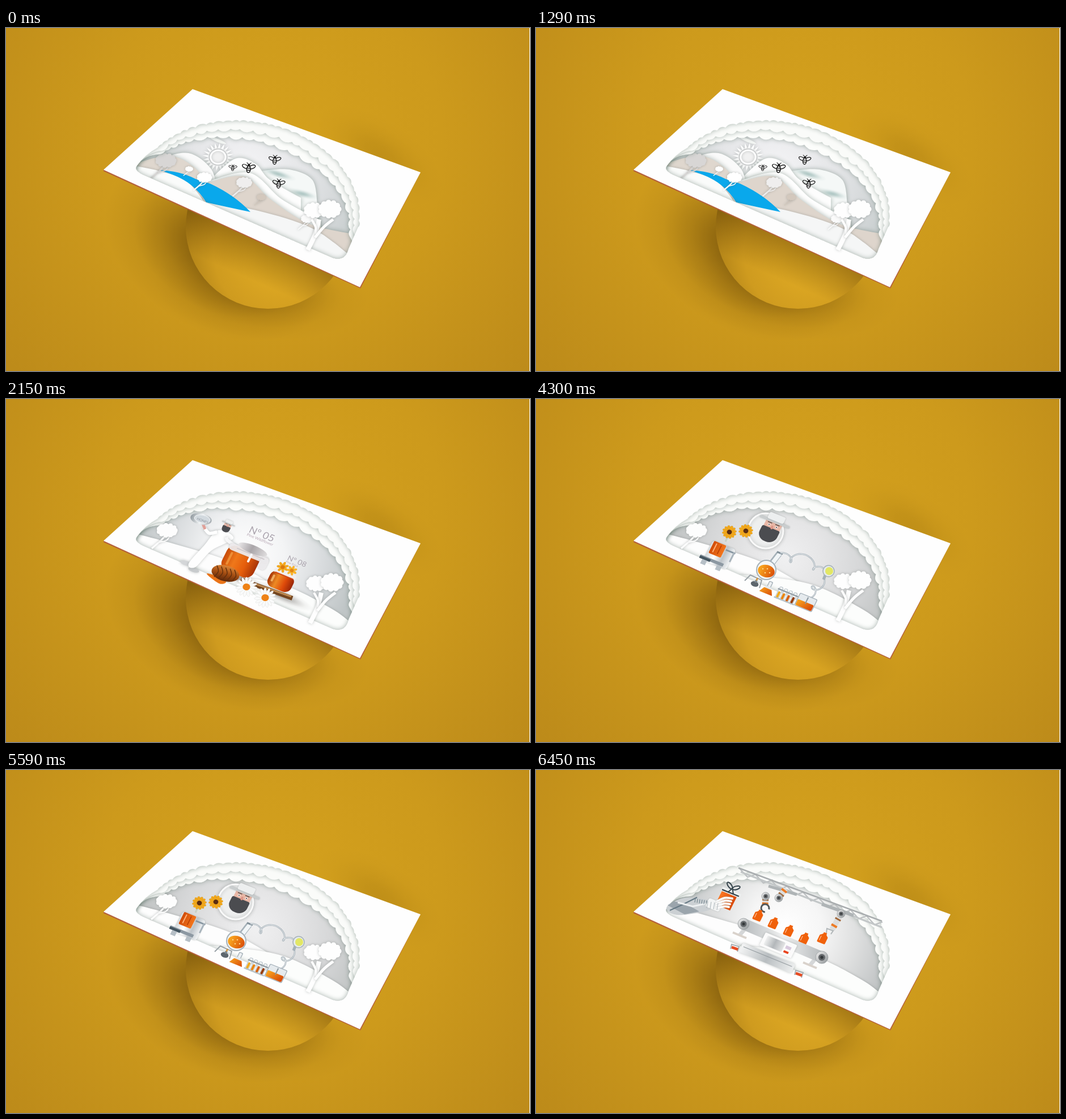
Animation, 924 px wide and 606 px high, one loop 8.6 s. Source, as an HTML page with a canvas:

```html
<!DOCTYPE html>
<html lang="en">
<head>
<meta charset="utf-8">
<title>Paper cut card</title>
<style>
html, body { margin: 0; width: 100%; height: 100%; overflow: hidden; background: #c8961c; }
canvas { display: block; }
</style>
</head>
<body>
<canvas id="stage" width="924" height="606"></canvas>
<script>
const c = document.getElementById('stage').getContext('2d');
const HOLD = 2150, TAU = Math.PI * 2;
const SHADE = 'rgba(82,105,94,.5)', SOFT = 'rgba(85,95,92,.36)';
let seed;
const rnd = () => (seed = seed * 16807 % 2147483647) / 2147483647;

// Paths
function poly(p, open) {
  const d = new Path2D();
  for (let i = 0; i < p.length; i += 2) d.lineTo(p[i], p[i + 1]);
  if (!open) d.closePath();
  return d;
}
function curve(p, open) {
  const d = new Path2D(), n = p.length / 2;
  const get = (i, k) => p[2 * (open ? Math.max(0, Math.min(n - 1, i)) : (i + n) % n) + k];
  d.moveTo(p[0], p[1]);
  for (let i = 0; i < n - (open ? 1 : 0); i++) {
    const q = [0, 1].map(k => {
      const [a, b, e, f] = [i - 1, i, i + 1, i + 2].map(j => get(j, k));
      return [b + (e - a) / 6, e - (f - b) / 6, e];
    });
    d.bezierCurveTo(q[0][0], q[1][0], q[0][1], q[1][1], q[0][2], q[1][2]);
  }
  if (!open) d.closePath();
  return d;
}

// Paint
function fill(p, color) { c.fillStyle = color; c.fill(p instanceof Path2D ? p : poly(p)); }
const blob = (p, color) => fill(curve(p), color);
function line(p, color, w = 1, smooth) {
  c.strokeStyle = color; c.lineWidth = w;
  c.stroke(smooth ? curve(p, true) : poly(p, true));
}
function box(x, y, w, h, color, r = 0, edge) {
  c.beginPath(); c.roundRect(x, y, w, h, r);
  c.fillStyle = color; c.fill();
  if (edge) { c.strokeStyle = edge; c.lineWidth = 1.4; c.stroke(); }
}
function oval(x, y, rx, ry, color, rot = 0, edge, w = 1) {
  c.beginPath(); c.ellipse(x, y, rx, ry, rot, 0, TAU);
  if (color) { c.fillStyle = color; c.fill(); }
  if (edge) { c.strokeStyle = edge; c.lineWidth = w; c.stroke(); }
}
const dot = (x, y, r, color, edge, w) => oval(x, y, r, r, color, 0, edge, w);
function ramp(g, stops) {
  stops.forEach((s, i) => g.addColorStop(i / (stops.length - 1), s));
  return g;
}
const lin = (x, y, u, v, ...s) => ramp(c.createLinearGradient(x, y, u, v), s);
const rad = (x, y, r, ...s) => ramp(c.createRadialGradient(x, y, 0, x, y, r), s);
function shaded(blur, color, draw) {
  c.save(); c.shadowBlur = blur; c.shadowColor = color; draw(); c.restore();
}
// Tilted frame lying on the card
function at(x, y, s, draw) {
  c.save(); c.transform(.93 * s, .38 * s, -.42 * s, .85 * s, x, y); draw(); c.restore();
}
function glow(x, y, rx, ry, rgb, alpha, rot = 0) {
  const tone = k => `rgba(${rgb},${alpha * k})`;
  c.save(); c.translate(x, y); c.rotate(rot); c.scale(rx, ry);
  c.fillStyle = rad(0, 0, 1, tone(1), tone(.8), tone(.42), tone(.12), tone(0));
  c.fillRect(-1, -1, 2, 2); c.restore();
}
// Cut-out with the shadow of its rim falling inside
function hole(d, color, paint) {
  c.save(); c.clip(d); c.fillStyle = color; c.fillRect(200, 140, 450, 300);
  paint();
  const rim = new Path2D(); rim.rect(0, 0, 924, 606); rim.addPath(d);
  c.shadowBlur = 9; c.shadowColor = SHADE; c.fillStyle = '#fff';
  c.fill(rim, 'evenodd'); c.restore();
}

function backdrop() {
  c.fillStyle = rad(470, 210, 600, '#d4a11d', '#cd9a1c', '#bd8b1a');
  c.fillRect(0, 0, 924, 606);
  glow(660, 225, 130, 60, '110,75,0', .16, .6);
  glow(375, 390, 215, 145, '70,42,0', .6, .5);
  glow(450, 465, 190, 85, '70,42,0', .3, .1);
  const ball = new Path2D(); ball.arc(462, 351, 145, 0, TAU);
  fill(ball, rad(490, 395, 185, '#dfab23', '#dba622', '#cf9b1f', '#a97c16'));
  fill(ball, lin(405, 352, 375, 420, 'rgba(80,50,0,.42)', 'rgba(80,50,0,0)'));
  fill([172, 250, 624, 456, 731, 255, 625, 460, 172, 253], '#b5603c');
  fill([329, 108, 731, 255, 624, 458, 172, 250.5], '#fefefe');
  c.fillStyle = '#fff'; c.fillRect(923, 0, 1, 606);
}

// Scalloped rim along a slanted half ellipse; depth shrinks it towards the sky
function rim(depth, size, bulge) {
  const d = new Path2D(), w = 1 - .05 * depth, h = 1 - .2 * depth;
  const pt = a => [420 - 185 * w * Math.cos(a) + 82 * h * Math.sin(a), 322 - 73 * w * Math.cos(a) - 139 * h * Math.sin(a)];
  let a = .3, [x, y] = pt(a);
  d.moveTo(231, 243); d.quadraticCurveTo(244, 224, x, y);
  while (a < 2.85) {
    a += size * (.7 + .6 * rnd());
    const [u, v] = pt(a), b = bulge * (.7 + .7 * rnd());
    d.quadraticCurveTo((x + u) / 2 + (v - y) * b, (y + v) / 2 - (u - x) * b, u, v);
    [x, y] = [u, v];
  }
  return d;
}
function frame(sky, inside) {
  seed = 77;
  const outer = rim(0, .08, .3);
  outer.lineTo(604, 390); outer.quadraticCurveTo(598, 413, 576, 406);
  outer.lineTo(246, 261); outer.quadraticCurveTo(224, 252, 231, 243);
  const [mid, inner] = [[.5, .1], [1, .11]].map(([depth, size]) => {
    const d = rim(depth, size, -.34);
    d.lineTo(650, 450); d.lineTo(190, 310); d.closePath();
    return d;
  });
  hole(outer, '#fafbf9', () => hole(mid, '#fcfdfb', () => hole(inner, sky, inside)));
}
// Smooth ridge, filled down to the bottom
function hill(p, color) {
  const d = curve(p, true);
  d.lineTo(p[p.length - 2], 440); d.lineTo(p[0], 440);
  fill(d, color);
}
function ground() {
  shaded(5, SOFT, () => {
    hill([205, 232, 300, 257, 400, 289, 490, 340], '#fdfdfd');
    hill([360, 310, 480, 326, 575, 371, 625, 410], '#fcfdfc');
  });
}

function crown(x, y, rx, ry, color) {
  const d = new Path2D();
  d.ellipse(x, y, rx, ry, .15, 0, TAU);
  for (let i = 0; i < 11; i++) {
    const a = i / 11 * TAU, r = ry * .36, u = x + Math.cos(a) * rx * .82, v = y + Math.sin(a) * ry * .82;
    d.moveTo(u + r, v); d.arc(u, v, r, 0, TAU);
  }
  fill(d, color);
}
function tree(x, y, s, color) {
  c.save(); c.translate(x, y); c.scale(s, s);
  shaded(4, SOFT, () => {
    line([0, 0, -7, 14, -27, 32], color, 3.2, true);
    line([7, 5, 0, 17, -14, 21], color, 2.2, true);
    crown(0, 0, 18, 11, color);
  });
  c.restore();
}
function bigTree(dx, dy) {
  c.save(); c.translate(dx, dy);
  shaded(5, SOFT, () => {
    line([532, 392, 545, 365, 552, 338], '#fefefe', 8, true);
    line([546, 364, 546, 352, 539, 338], '#fefefe', 4, true);
    line([545, 370, 560, 352, 577, 338], '#fefefe', 5, true);
    crown(543, 322, 17, 12, '#fefefe');
    crown(571, 320, 19, 14, '#fefefe');
  });
  c.restore();
}
function bee(x, y, s) {
  at(x, y, s, () => {
    const k = '#171717';
    c.rotate(-.35);
    for (const e of [-1, 1]) {
      oval(6 * e, -1, 6, 3.2, null, -.5 * e, k, 1.5);
      line([0, -5, 4 * e, -9], k, 1.1);
    }
    oval(0, 4, 3.3, 6.5, '#fff', 0, k, 1.6);
    dot(0, -4, 2.2, k);
    box(-3, 1, 6, 1.6, k); box(-3, 5, 6, 1.6, k);
  });
}
function sun() {
  for (let i = 0; i < 20; i++) {
    c.rotate(TAU / 20); fill([-2.7, -16, 0, -27, 2.7, -16], '#fff');
  }
  dot(0, 0, 13, '#f1f1f1', '#fff', 3);
}

function valley() {
  frame(rad(425, 250, 200, '#f4f4f6', '#e5e6e8', '#ccd1d2'), () => {
    shaded(5, SOFT, () => {
      at(374, 199, 1, () => oval(0, 0, 15, 3, '#f5f7f5'));
      at(374, 228, 1, sun);
    });
    shaded(9, SHADE, () => {
      hill([452, 252, 500, 250, 540, 268, 549, 310], '#f5f8f7');
      hill([360, 268, 404, 231, 440, 240, 465, 268, 520, 300], '#fdfdfd');
      hill([270, 230, 322, 221, 361, 248, 372, 285], '#fafafa');
      hill([205, 247, 286, 226, 336, 250, 350, 285], '#dfd7ce');
      hill([358, 270, 430, 256, 487, 303, 555, 340], '#fefefe');
      hill([348, 276, 418, 262, 468, 304, 535, 346, 622, 366], '#ded5cc');
    });
    glow(480, 258, 34, 8, '105,150,145', .5, .3);
    glow(523, 293, 30, 8, '105,150,145', .5, .25);
    shaded(5, SOFT, () => {
      hill([205, 240, 268, 252, 320, 272, 360, 322], '#fafbfa');
      hill([354, 307, 445, 323, 540, 354, 612, 406], '#f5f6f6');
    });
    fill(new Path2D('M269 251Q306 252 335 267L360 275Q403 295 431 325Q388 316 353 308Q344 292 326 277Q306 261 269 251Z'), '#09a8ec');
    tree(282, 234, 1, '#d8d6d5');
    tree(323, 249, .38, '#fff');
    tree(350, 264, .72, '#fff');
    tree(420, 273, .76, '#efeeee');
    tree(450, 299, .45, '#d3c8bd');
    tree(531, 337, .6, '#fafafa');
  });
  bigTree(0, 0);
  bee(400, 246, .62); bee(428, 246, .98); bee(474, 232, .9); bee(481, 274, .92);
}

function petals(x, y, r, n, petal, core, width = .23) {
  at(x, y, 1, () => {
    for (let i = 0; i < n; i++) {
      c.rotate(TAU / n);
      oval(0, -r * .62, r * width, r * .43, petal, 0, 'rgba(120,120,110,.18)', .6);
    }
    dot(0, 0, r * .36, core);
  });
}
function label(x, y, s, big, small) {
  at(x, y, s, () => {
    c.fillStyle = '#aaa3ad'; c.font = '18px Lato, sans-serif'; c.fillText(big, 0, 0);
    c.fillStyle = '#b7a7b4'; c.font = '7px Lato, sans-serif'; c.fillText(small, 0, 7);
  });
}
function head(x, y, s) {
  at(x, y, s, () => {
    box(-15, -2, 30, 20, '#e9b7a6');
    box(-17, 11, 33, 27, '#4b4c50', [3, 3, 15, 15]);
    for (const e of [-7, 7]) {
      dot(e, 6, 2, '#fff'); dot(e, 6, 1, '#222');
      box(e - 4, 1, 8, 1.5, '#514640');
    }
    box(-2, 6, 4, 7, '#dd9688', 2);
    shaded(3, SOFT, () => {
      box(-28, -5, 56, 5, '#c9cdce', 2);
      box(-15, -17, 30, 13, '#edefef', 3);
    });
  });
}

function honey() {
  frame(rad(425, 275, 198, '#fff', '#f3f4f5', '#d9dcde', '#bfc5c6'), ground);
  tree(284, 232, 1, '#fdfdfd');
  bigTree(4, 4);
  glow(485, 347, 62, 13, '60,55,50', .45, .42);
  glow(415, 318, 50, 12, '60,40,30', .45, .42);

  // Keeper with lid
  shaded(5, SOFT, () => {
    oval(317, 290, 10, 4, '#d4d6d8', .3);
    oval(331, 302, 10, 4, '#c8cbcd', .3);
    blob([374, 232, 401, 246, 362, 268, 334, 297, 322, 291, 350, 258], '#fefefe');
    line([372, 235, 358, 237, 349, 226], '#fff', 6, true);
    line([389, 244, 391, 250, 411, 264], '#f6f6f7', 6, true);
  });
  line([347, 220, 351, 230], '#dfa098', 5);
  oval(344, 212, 19, 10, lin(326, 205, 362, 220, '#8e979d', '#eff2f3', '#a3aaaf'), .2);
  oval(346, 212, 14, 7, '#d2d9de', .2, '#f6f8f9');
  at(337, 211, 1, () => { c.fillStyle = '#8a929a'; c.font = '6px Lato, sans-serif'; c.fillText('HONEY', 0, 2); });
  head(392, 221, .43);

  // Large jar
  at(412, 290, 1, () => {
    box(-30, -28, 60, 50, lin(-30, 0, 30, 0, '#c94c08', '#ef781a', '#e55d0b', '#a83406'), 15);
    box(-22, -14, 4, 26, 'rgba(255,185,90,.5)', 2);
    shaded(3, SOFT, () => {
      box(-30, -30, 74, 13, 'rgba(240,237,239,.92)', 6);
      box(30, -28, 15, 24, 'rgba(240,237,239,.9)', 6);
    });
    oval(10, -33, 27, 8, lin(-20, 0, 36, 0, '#f1eff0', '#aaa6a9', '#dedcdd'));
    box(-16, -25, 52, 2, '#cfcacd');
    box(10, -25, 4, 18, '#f9f8f9', 2);
  });

  // Dipper and spill
  blob([354, 309, 372, 313, 388, 323, 376, 326], '#ea7418');
  line([414, 319, 505, 352], '#73451f', 8);
  line([440, 327, 503, 349], '#bc8850', 3);
  c.save(); c.translate(387, 308); c.rotate(.25);
  oval(0, 0, 25, 14, lin(0, -15, 0, 15, '#e0893a', '#a34d12', '#57240a'));
  for (let x = -16; x < 20; x += 8) line([x - 2, -10, x + 3, 0, x - 2, 11], '#63300e', 1.5, true);
  c.restore();

  // Small jar
  at(485, 321, 1, () => {
    box(-22, -15, 44, 33, lin(-22, 0, 22, 0, '#a73608', '#ed8a24', '#df4b0a', '#982507'), 12);
    box(-17, -6, 4, 14, 'rgba(255,205,130,.7)', 2);
    box(-20, -19, 42, 8, '#f2eeee', 4);
    box(-16, -12, 34, 2, '#d14516');
  });
  petals(488, 297, 10, 7, '#f6a91b', '#dc790e');
  petals(504, 303, 9, 7, '#ffb629', '#e28714');
  petals(424, 332, 18, 15, '#fafbfb', '#ee8216', .15);
  petals(457, 351, 18, 15, '#fafbfb', '#ee8216', .15);
  label(427, 235, 1, 'Nº 05', 'Pine Wildflower');
  label(495, 284, .75, 'Nº 08', 'Pine Erica');
}

// Looping glass tube between two points
function coil(x, y, u, v, r, turns) {
  const p = [];
  for (let i = 0; i <= 40; i++) {
    const t = i / 40, a = t * turns * TAU, k = r * Math.sin(t * Math.PI);
    p.push(x + (u - x) * t + k * Math.sin(a), y + (v - y) * t - k * Math.cos(a));
  }
  line(p, '#a2adb5', 2.7, true); line(p, '#f4f7f8', 1, true);
}
function lab() {
  const glass = '#a5b1b9', amber = h => lin(-12, 0, 12, h, '#f7a11e', '#d84a07');
  frame(rad(440, 280, 200, '#f0f0f1', '#e5e5e6', '#d6d7d8', '#c1c4c4'), ground);
  tree(283, 232, 1, '#fdfdfd');
  bigTree(0, 0);
  shaded(6, SOFT, () => dot(405, 233, 31, '#eeefef', '#f9f9f9', 3));
  head(420, 219, 1);

  // Sunflowers and extractor
  line([340, 239, 334, 252], '#c8d0c5', 3);
  line([368, 238, 348, 243, 338, 251], '#dfe3dc', 3, true);
  for (const [x, y] of [[341, 235], [370, 233]]) petals(x, y, 12, 12, '#f2a719', '#5b2d11');
  at(322, 274, 1, () => {
    shaded(3, SOFT, () => box(-20, -20, 44, 42, lin(-20, 0, 24, 0, '#d5dadd', '#fff', '#bcc3c8', '#f2f4f5'), 5));
    box(-17, -20, 23, 25, lin(-17, 0, 6, 0, '#d24d08', '#f2751b'), 2);
    box(-12, -17, 2, 18, '#ffb078'); box(-3, -17, 1.5, 18, '#b63c04');
    box(-28, 13, 44, 6, '#8c98a2'); box(-28, 15, 20, 5, '#455661');
    box(8, -14, 18, 3, '#8796a1'); box(22, -14, 3, 20, '#a8b3bb');
    for (const x of [-22, 6]) box(x, 20, 9, 9, '#b6bfc6');
  });

  // Round flask and tubes
  line([412, 295, 429, 273], glass, 11); line([413, 295, 430, 273], '#f1f5f7', 7);
  line([425, 270, 435, 274], '#83919a', 3);
  dot(406, 302, 17, '#f4f6f7', glass, 2);
  c.save(); c.translate(406, 304); oval(0, 0, 15, 11, amber(12), .25); c.restore();
  for (let i = 0; i < 4; i++) dot(400 + i * 4, 300 + i % 2 * 7, 1.3, '#ffd182');
  coil(431, 272, 508, 300, 12, 2);
  coil(509, 316, 482, 352, 9, 1.5);
  line([511, 309, 507, 319], glass, 5);
  dot(516, 304, 10, '#e5eaec', glass, 1.5);
  dot(517, 304, 7, '#e2e765');

  // Bench
  line([368, 321, 378, 311, 398, 320, 394, 334], '#9ba3a8', 2);
  at(386, 326, 1, () => {
    oval(0, 1, 7, 5, '#5d666d'); box(-2, -7, 4, 5, '#7c868d'); oval(0, -9, 1.5, 3, '#d49640');
  });
  at(409, 335, 1, () => {
    box(-3, -14, 6, 11, '#edf0f2', 1, glass);
    fill([-4, -4, 4, -4, 12, 10, -12, 10], '#e4e9ec');
    fill([-7, 0, 7, 0, 12, 10, -12, 10], amber(10));
  });
  at(442, 347, 1, () => {
    ['#efaa20', '#e9850f', '#d75f0a', '#963c0a'].forEach((k, i) => {
      const x = -14 + i * 9;
      box(x - 3, -11, 6, 23, '#f6f8f8', 3, '#c3ccd1'); box(x - 2, -2, 4, 13, k, 2);
    });
    box(-19, -7, 38, 2.5, '#96a1a8'); box(-19, 10, 38, 2.5, '#b7c0c6');
  });
  at(476, 359, 1, () => {
    box(-16, -12, 32, 25, '#e5eaed', 2, glass);
    box(-15, 0, 30, 12, amber(12), 2);
    box(-1, -10, 2, 13, '#8b989f');
  });
}

function bottle(x, y) {
  at(x, y, 1, () => {
    const k = '#f0610b';
    box(-7.5, -5, 15, 15, k, 2);
    fill([-7, -4, -3, -8, 3, -8, 7, -4], k);
    box(-3, -11, 6, 4, k);
    box(-5, -3, 1.2, 9, '#ffc09a');
  });
}
function joint(x, y, r) {
  dot(x, y, r, lin(x - r, y - r, x + r, y + r, '#f2f2f2', '#8f9496'), '#9a9fa1', .8);
  dot(x, y, r * .55, '#65696c'); dot(x, y, r * .25, '#34383a');
}
// Robot arm segment with a coloured cuff
function link(x, y, u, v) {
  c.save(); c.translate(x, y); c.rotate(Math.atan2(v - y, u - x));
  const n = Math.hypot(u - x, v - y);
  box(0, -5, n, 10, '#dcdddd', 1);
  box(n * .3, -5.5, 3, 11, '#a1683b'); box(n * .7, -5.5, 4, 11, '#ed7b25');
  c.restore();
  joint(x, y, 7);
}
function factory() {
  frame(rad(440, 280, 190, '#fff', '#f6f6f6', '#dedfdf', '#c1c4c5'), ground);

  // Roof truss
  const zig = [];
  for (let i = 0; i <= 18; i++) zig.push(359 + i * 14, 174 + i * 5.25 + i % 2 * 10);
  line(zig, '#bcbfc1', 2.2);
  line([357, 173, 610, 267], '#a9adaf', 2.5);
  line([361, 180, 610, 278], '#c3c7c8', 3);

  // Arms and bottles
  line([410, 205, 460, 220], '#afb4b6', 5); line([504, 237, 560, 257], '#afb4b6', 6);
  link(428, 226, 440, 210);
  link(405, 223, 404, 239);
  c.strokeStyle = '#54595b'; c.lineWidth = 3;
  c.beginPath(); c.arc(404, 244, 7, 1.6, 6.6); c.stroke();
  link(538, 254, 522, 282);
  line([512, 288, 513, 280, 524, 284, 520, 290], '#b0b6b8', 2);
  for (let i = 0; i < 4; i++) bottle(392 + i * 27, 257 + i * 13.5);
  bottle(506, 297);

  // Conveyor
  for (const [x, y] of [[366, 272], [490, 325]]) {
    line([x + 3, y + 8, x - 7, y + 20], '#d5d7d8', 7);
    line([x - 19, y + 15, x + 5, y + 25], '#d9d2cb', 4);
  }
  c.lineCap = 'round';
  line([366, 272, 504, 331], lin(366, 0, 504, 0, '#b7bbbd', '#f0f1f1', '#b7bbbd'), 20);
  c.lineCap = 'butt';
  joint(366, 272, 10); joint(504, 331, 11);

  // Console
  for (const [x, y] of [[343, 308], [456, 354]]) {
    line([x, y + 8, x + 2, y, x + 15, y + 4, x + 12, y + 13], '#a9b0b4', 2);
    line([x + 2, y + 5, x + 13, y + 9], '#e64c23', 5);
  }
  at(408, 331, 1, () => {
    shaded(4, SOFT, () => box(-50, -8, 100, 19, lin(-50, 0, 50, 0, '#f3f4f4', '#b9bec1', '#eceeee'), 4));
    box(-46, -2, 92, 1, '#949b9f');
  });
  at(427, 310, 1, () => {
    shaded(4, SOFT, () => box(-30, -14, 60, 27, '#fbfbfb', 2));
    box(-24, -10, 34, 19, lin(-24, 0, 10, 0, '#eff0f0', '#b3b7ba', '#e3e4e4'), 2);
    box(13, -6, 10, 6, '#d8c9dd'); box(13, 4, 9, 4, '#e9441d');
  });

  // Hand with the gift
  blob([232, 240, 262, 226, 304, 230, 308, 246, 260, 256, 236, 252], '#cbd0d3');
  fill([232, 239, 243, 232, 266, 237, 288, 250, 262, 255], '#9ba5ac');
  line([236, 248, 258, 238, 284, 225], '#667984', 2);
  line([250, 234, 276, 241, 300, 236], '#edf0f1', 3);
  for (let i = 0; i < 6; i++) line([281 + i * 4, 227 + i * .7, 280 + i * 4, 234 + i * .7], '#778891', 1.2);
  at(335, 231, 1, () => {
    box(-14, -14, 28, 28, lin(-14, 0, 14, 0, '#fa7724', '#dc4a08'));
    box(-16, -22, 35, 8, '#edf0f0'); box(-15, -18, 32, 2.5, '#39474f');
  });
  c.save(); c.translate(346, 210); c.rotate(.35);
  for (const e of [-1, 1]) {
    oval(6 * e, -4, 7, 3, null, -.6 * e, '#34434b', 2);
    line([0, -1, 5 * e, 8], '#34434b', 2);
  }
  c.restore();
  c.lineCap = 'round';
  shaded(2, SOFT, () => {
    at(313, 238, 1, () => box(-12, -9, 26, 18, '#f3f5f5', 4));
    for (let i = 0; i < 4; i++) line([319, 232 + i * 4, 333, 226 + i * 5, 346 - i * 2, 227 + i * 5], '#fafafa', 4, true);
  });
  c.lineCap = 'butt';
  for (let i = 0; i < 4; i++) line([303 + i * 6, 232 + i, 301 + i * 6, 244 + i], '#a8b1b6', 1);
}

const scenes = [valley, honey, lab, factory];
let shown = -1;
function tick() {
  const i = Math.floor(performance.now() / HOLD) % scenes.length;
  if (i !== shown) {
    shown = i;
    backdrop();
    scenes[i]();
  }
  requestAnimationFrame(tick);
}
tick();
</script>
</body>
</html>
```
